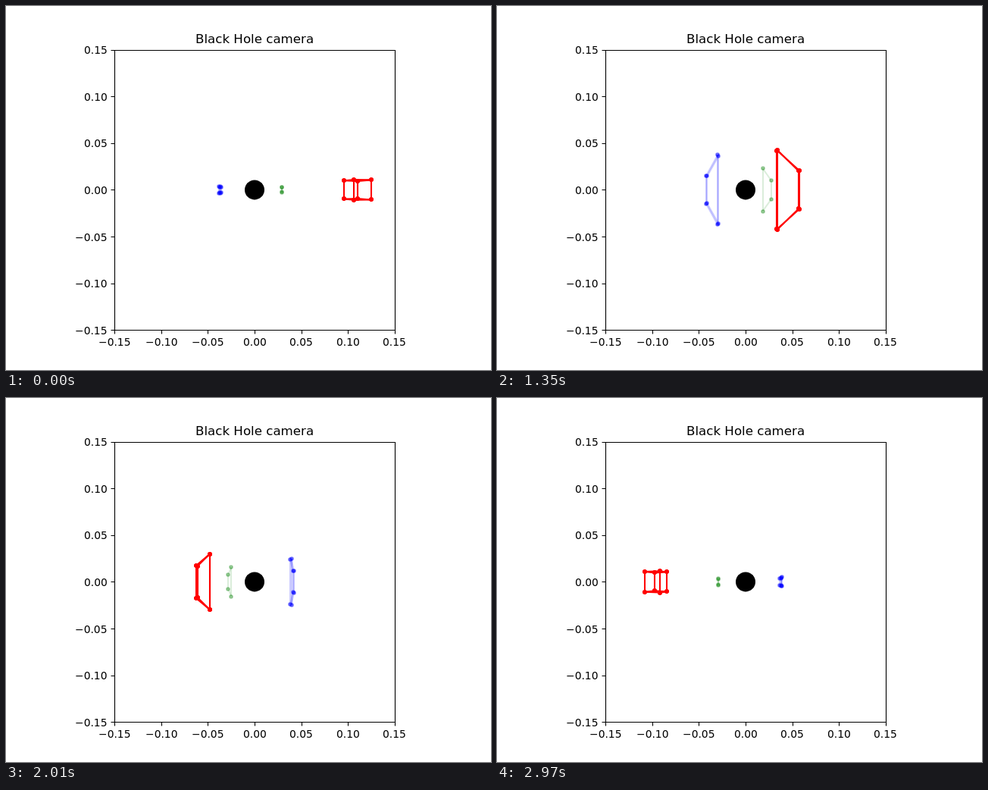
An HTML page with a canvas that plays this animation: 640 by 480 pixels, repeating every 3000 ms.

```html
<!DOCTYPE html>
<html lang="en">
<head>
<meta charset="utf-8">
<title>Black Hole camera</title>
<style>
  html, body { margin: 0; width: 640px; height: 480px; overflow: hidden; background: #fff; }
  svg, canvas { position: absolute; left: 0; top: 0; }
  text { font-family: "DejaVu Sans", sans-serif; }
</style>
</head>
<body>
<svg width="640" height="480">
  <circle cx="328" cy="242.4" r="13"/>
  <path id="axes" fill="none" stroke="#000" stroke-width="1.11"/>
</svg>
<canvas width="640" height="480"></canvas>
<script>
const CX = 328, CY = 242.4, LEFT = 143.2, TOP = 57.6, STEP = 61.6;
const svg = document.querySelector('svg');
const ctx = document.querySelector('canvas').getContext('2d');
const snap = v => Math.round(v) + 0.5;

// Text starts on a whole pixel; align is 0.5 for centred, 1 for right.
function label(str, x, y, align, size = 13.89) {
  const el = document.createElementNS('http://www.w3.org/2000/svg', 'text');
  el.textContent = str;
  el.setAttribute('font-size', size);
  svg.append(el);
  el.setAttribute('x', Math.round(x - align * el.getComputedTextLength()));
  el.setAttribute('y', Math.round(y));
}

function drawAxes() {
  let d = 'M143.5 58.5H513.5V427.5H143.5Z';
  for (let k = 0; k < 7; k++) {
    const x = LEFT + k * STEP, y = TOP + k * STEP;
    const value = (k - 3) * 0.05;
    const str = n => (n < -0.01 ? '\u2212' : '') + Math.abs(n).toFixed(2);
    d += `M${snap(x)} 427.5v5M143.5 ${snap(y)}h-5`;
    label(str(value), x, 448, 0.5);
    label(str(-value), 133.5, y + 5.6, 1);
  }
  label('Black Hole camera', CX, 49, 0.5, 16.67);
  document.getElementById('axes').setAttribute('d', d);
}

// Apparent radius in px for signed source offsets -16, -12 ... 16, per cube face.
// Negative offsets give the image on the far side of the hole.
const NEAR = [43, 44.5, 47, 52, 61, 81.8, 113.3, 156.3, 208];
const FAR = [44.5, 46, 48.3, 53.2, 62.6, 79.3, 104.1, 137.9, 176];

function radius(knots, s) {
  const u = s / 4 + 4, i = Math.floor(u), t = u - i;
  const [a, b, c, d] = knots.slice(i - 1, i + 3);
  return b + t / 2 * (c - a + t * (2 * a - 5 * b + 4 * c - d + t * (3 * (b - c) + d - a)));
}

const IMAGES = [
  { color: '#008000', alpha: 0.075, bend: () => 36.1 },
  { color: '#0000ff', alpha: 0.2, bend: (knots, r) => -radius(knots, -r) },
  { color: '#ff0000', alpha: 1, bend: radius }
];

// Corner bits: 1 = x side, 2 = y side, 4 = depth; an edge flips one bit.
const CORNERS = [0, 1, 2, 3, 4, 5, 6, 7];
const EDGES = CORNERS.flatMap(c => [1, 2, 4].filter(bit => !(c & bit)).map(bit => [c, c | bit]));

function project(corner, center, bend) {
  const x = center + (corner & 1 ? 1 : -1);
  const y = corner & 2 ? 1 : -1;
  const r = Math.hypot(x, y);
  const k = bend(corner & 4 ? FAR : NEAR, r) / r;
  return [CX + x * k, CY - y * k];
}

function dot([x, y]) {
  ctx.beginPath();
  ctx.arc(Math.round(x), Math.round(y), 2.08, 0, 7);
  ctx.lineWidth = 1.39;
  ctx.fill();
  ctx.stroke();
}

function line(p, q) {
  const upright = Math.abs(p[0] - q[0]) < 0.01;
  const fit = x => upright ? Math.round(x) : x;
  ctx.beginPath();
  ctx.moveTo(fit(p[0]), p[1]);
  ctx.lineTo(fit(q[0]), q[1]);
  ctx.lineWidth = 2.08;
  ctx.stroke();
}

function draw(now) {
  const tick = Math.floor(now / 30) % 100;
  const center = 10.8 - 0.2 * tick;
  ctx.clearRect(0, 0, 640, 480);
  for (const { color, alpha, bend } of IMAGES) {
    ctx.globalAlpha = alpha;
    ctx.fillStyle = ctx.strokeStyle = color;
    const points = CORNERS.map(c => project(c, center, bend));
    for (const [a, b] of EDGES) {
      line(points[a], points[b]);
      dot(points[a]);
      dot(points[b]);
    }
  }
}

function loop() {
  draw(performance.now());
  requestAnimationFrame(loop);
}

drawAxes();
loop();
</script>
</body>
</html>
```
